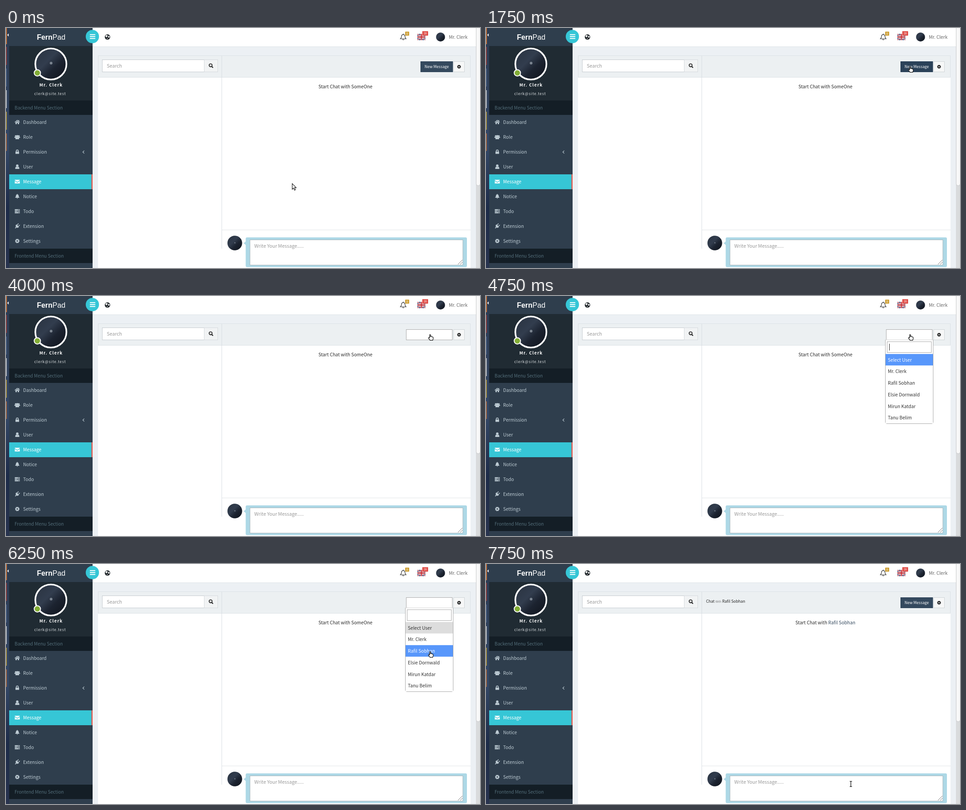
Write an HTML page that moves like this. It is 1051x533 px and loops after 8 s.

```html
<!DOCTYPE html>
<html lang="en">
<head>
<meta charset="utf-8">
<title>Message panel</title>
<style>
  html, body { margin: 0; width: 100%; height: 100%; overflow: hidden; background: #ecf0f4; }
  svg { display: block; }
  text { font: 10.2px "Noto Sans CJK JP", "Noto Sans CJK SC", "Noto Sans", sans-serif; white-space: pre; }
  .mid { text-anchor: middle; }
  .brand { font: 16px "Liberation Sans", Arial, sans-serif; fill: #fff; }
  .brand tspan, .name { font-weight: bold; }
  .name { font-size: 9.5px; letter-spacing: 1.2px; fill: #fff; }
  .mail { font-size: 8.1px; letter-spacing: 1px; fill: #e4e8ea; }
  .section { fill: #526c78; font-size: 10.1px; }
  .item { fill: #bccad2; color: #bccad2; }
  .item.on { fill: #fff; color: #fff; }
  .hint { fill: #999; font-size: 10.6px; }
  .small { font-size: 8.65px; }
  .badge { font-size: 6px; fill: #fff; text-anchor: middle; }
</style>
</head>
<body>
<svg id="stage" width="1051" height="533" viewBox="0 0 1051 533">
  <defs>
    <linearGradient id="photo" x1="0" y1="0" x2="1" y2="1">
      <stop offset="0" stop-color="#29323f"/><stop offset=".4" stop-color="#323d4e"/>
      <stop offset=".62" stop-color="#1c2330"/><stop offset="1" stop-color="#0e131b"/>
    </linearGradient>
    <linearGradient id="desk" x1="0" y1="0" x2="0" y2="1">
      <stop offset="0" stop-color="#2c3a50"/><stop offset=".5" stop-color="#344766"/>
      <stop offset=".75" stop-color="#1d2b49"/><stop offset="1" stop-color="#28334f"/>
    </linearGradient>
    <g id="gear" fill="none" stroke="currentColor">
      <circle r="2.8" stroke-width="2.4"/>
      <circle r="4.2" stroke-width="1.6" stroke-dasharray="1.7 1.6"/>
    </g>
    <g id="home" fill="currentColor"><path d="M-6 0 0-5 6 0 5 1 0-3.2-5 1zM-4 1 0-2.3 4 1V4.5H1V1.5H-1V4.5H-4zM2.6-4.5H4.2V-1L2.6-2.3z"/></g>
    <g id="user" fill="currentColor"><circle cy="-2.3" r="2.8"/><path d="M-4.5 5V3Q-4.3.2-2 0 0 1.6 2 0 4.3.2 4.5 3V5z"/></g>
    <g id="team"><use href="#user" transform="translate(-3.6 -1) scale(.6)"/><use href="#user" transform="translate(3.6 -1) scale(.6)"/><use href="#user" y=".5" transform="scale(.9)"/></g>
    <g id="lock" fill="currentColor"><path d="M-4-.5H4V4.5H-4z"/><path d="M-2.3 0V-2A2.3 2.3 0 0 1 2.3-2V0" fill="none" stroke="currentColor" stroke-width="1.5"/></g>
    <g id="letter" fill="currentColor"><path d="M-5.5-4H5.5V-3L0 1-5.5-3zM-5.5-1.6 0 2.4 5.5-1.6V4.3H-5.5z"/></g>
    <g id="bell" fill="currentColor"><path d="M-5 3Q-3 1-3-1.5-3-4-.6-4.4V-5.4H.6V-4.4Q3-4 3-1.5 3 1 5 3zM-1.4 3.6H1.4Q1 5 0 5T-1.4 3.6z"/></g>
    <g id="tasks" fill="currentColor"><path d="M-5.5-4.5H5.5V-2H-5.5zM-5.5-1.2H5.5V1.3H-5.5zM-5.5 2.1H5.5V4.6H-5.5z"/><path d="M1-3.2H4.5M-1 0H4.5M2 3.3H4.5" stroke="#2f3e4d" stroke-width=".8"/></g>
    <g id="plug" fill="currentColor" transform="rotate(45)"><path d="M-4-1.5H4Q4 3 .8 3.3V6.5H-.8V3.3Q-4 3-4-1.5zM-2.8-6H-1.3V-2H-2.8zM1.3-6H2.8V-2H1.3z"/></g>
    <g id="arrow"><path d="M.6.6V13.2L3.5 10.5 5.7 15.3 7.9 14.3 5.8 9.6H9.5z" fill="#fff" stroke="#111" stroke-width="1.1"/></g>
    <g id="hand"><path d="M3.2 7.8V1.8Q3.3.7 4.3.7T5.4 1.8V5Q7-.1 4.9 5 6.2 4.3 7.2 5.4 8.4 4.9 9.2 5.9 11 5.7 11.2 7.4V9.7L10.1 13.4H4.3L1 9.1Q.3 7.8 1.3 7.3T3.2 7.8z" fill="#fff" stroke="#111" stroke-width="1.2"/></g>
    <g id="beam"><path d="M.5.7H2.3L3 1.2 3.7.7H5.5M3 1.2V11.8M.5 12.3H2.3L3 11.8 3.7 12.3H5.5" fill="none" stroke="#fff" stroke-width="2.6"/><path d="M.5.7H2.3L3 1.2 3.7.7H5.5M3 1.2V11.8M.5 12.3H2.3L3 11.8 3.7 12.3H5.5" fill="none" stroke="#111" stroke-width="1.3"/></g>
  </defs>

  <rect width="1051" height="533" fill="#ecf0f4"/>

  <!-- desktop edge -->
  <rect width="7" height="533" fill="url(#desk)"/>
  <path d="M0 0H2V36H0zM0 234H1.5V273H0z" fill="#c2743f"/>
  <path d="M0 42H1.5V82H0z" fill="#a8403a"/>
  <path d="M0 90H1.5V130H0z" fill="#50698f"/>
  <path d="M0 138H1.5V178H0z" fill="#d4d6da"/>
  <path d="M0 186H1.5V226H0z" fill="#c9a83f"/>
  <path d="M6 12V19L2.5 15.5z" fill="#e8e8e8"/>

  <!-- top bar -->
  <rect x="192" width="850" height="41" fill="#fff"/>
  <path d="M192 41.5H1042" stroke="#dfe4e8"/>
  <circle cx="225" cy="20" r="6" fill="#22282c"/>
  <path d="M221 16.5 224 15.5 225.5 18 223 20.5 220.5 19zM227 17 230 18.5 229 22 226.5 20.5zM223.5 22 225.5 23 224.5 25z" fill="#fff"/>
  <path d="M874.5 24Q877 21.5 877 18.5 877 14.7 880.8 14.3 884.6 14.7 884.6 18.5 884.6 21.5 887 24zM879 25Q880.8 28 882.6 25M880.8 12.6V14.3" fill="none" stroke="#333" stroke-width="1.2"/>
  <rect x="885" y="8" width="9" height="9" rx="1" fill="#cfa23a"/><text class="badge" x="889.5" y="14.7">0</text>
  <svg x="912" y="13" width="18" height="14" viewBox="0 0 18 14">
    <rect width="18" height="14" fill="#2b3f78"/>
    <path d="M0 0 18 14M18 0 0 14" stroke="#eee" stroke-width="3"/>
    <path d="M0 0 18 14M18 0 0 14" stroke="#c8353d" stroke-width="1.2"/>
    <path d="M9 0V14M0 7H18" stroke="#eee" stroke-width="4.4"/>
    <path d="M9 0V14M0 7H18" stroke="#c8353d" stroke-width="2.6"/>
  </svg>
  <rect x="923" y="7" width="13" height="10" rx="1" fill="#e0524d"/><text class="badge" x="929.5" y="14.2">16</text>
  <circle cx="963.5" cy="20" r="10" fill="url(#photo)"/>
  <text x="982" y="24" fill="#666">Mr. Clerk</text>

  <!-- sidebar -->
  <rect x="7" width="185" height="533" fill="#2f3e4d"/>
  <rect x="7" y="40" width="185" height="121" fill="#202b33"/>
  <rect x="7" y="161" width="185" height="32" fill="#141e26"/>
  <rect x="7" y="490" width="185" height="32" fill="#141e26"/>
  <rect x="7" y="325" width="185" height="33" fill="#36c6d6"/>
  <rect x="189.5" y="325" width="2.5" height="33" fill="#e2574f"/>
  <text class="brand mid" x="100" y="26"><tspan>Fern</tspan>Pad</text>
  <circle cx="191.5" cy="19" r="14.7" fill="#36c6d6"/>
  <path d="M186 14.8H198M186 19H198M186 23.2H198" stroke="#fff" stroke-width="2"/>
  <circle cx="99.5" cy="80" r="34.5" fill="url(#photo)" stroke="#fff" stroke-width="3.6"/>
  <circle cx="100" cy="78" r="3" fill="#7b8490"/>
  <circle cx="69.5" cy="99.7" r="7" fill="#82ad35" stroke="#fff" stroke-width="2"/>
  <text class="name mid" x="100" y="130">Mr. Clerk</text>
  <text class="mail mid" x="98" y="149">clerk@site.test</text>
  <text class="section" x="19" y="181">Backend Menu Section</text>
  <text class="section" x="19" y="510">Frontend Menu Section</text>
  <g id="menu"></g>
  <path d="M173.5 272.3 170.3 275.5 173.5 278.7" fill="none" stroke="#bccad2" stroke-width="1.2"/>

  <!-- chat panel -->
  <rect x="204" y="62" width="826" height="471" fill="#fff"/>
  <rect x="204.5" y="61.5" width="825" height="48" fill="#ecf0f2" stroke="#dce2e6"/>
  <path d="M478.5 62V490" stroke="#d8dee2"/>
  <path d="M479 448.5H1030" stroke="#e2e5e8"/>
  <rect x="213.5" y="70.5" width="226" height="27" fill="#fff" stroke="#c5cbd0"/>
  <rect x="439.5" y="70.5" width="30" height="27" fill="#f1f3f4" stroke="#d6dade"/>
  <text class="hint" x="223.5" y="87.5">Search</text>
  <path d="M456.3 85.5 459 88.3" stroke="#222" stroke-width="2.2"/>
  <circle cx="453.7" cy="82.8" r="3.3" fill="none" stroke="#222" stroke-width="1.7"/>
  <text id="chatWith" class="small" x="488" y="86" fill="#222">Chat <tspan font-size="6.2" fill="#777">With</tspan> Rafil Sobhan</text>
  <text id="intro" class="mid" x="752.5" y="133.5" fill="#2a2a2a">Start Chat with <tspan id="partner"></tspan></text>
  <rect x="992.5" y="74.5" width="24" height="23" fill="#f6f7f7" stroke="#cfd4d7"/>
  <use href="#gear" transform="translate(1004.5 86) scale(.85)" color="#222"/>

  <svg id="button" y="74">
    <rect id="face" width="100%" height="100%"/>
    <text class="mid" x="50%" y="15" fill="#fff" style="font-size:8.6px">New Message</text>
  </svg>
  <svg id="select">
    <rect width="100%" height="100%" fill="#fff" stroke="#aaa" stroke-width="2"/>
    <text id="picked" x="17" y="14.5" fill="#555">Ra...</text>
  </svg>
  <g id="drop">
    <path d="M886 97.5V280Q886 283 889 283H988Q991 283 991 280V97.5z" fill="#fff"/>
    <path d="M885.5 97V280Q885.5 283.5 889 283.5H988Q991.5 283.5 991.5 280V97" fill="none" stroke="#aaa"/>
    <rect x="889.5" y="101.5" width="98" height="24" fill="#fff" stroke="#aaa"/>
    <path id="caret" d="M894.5 106V121" stroke="#222"/>
    <g id="rows"></g>
  </g>

  <!-- composer -->
  <circle cx="507.3" cy="477.5" r="16.3" fill="url(#photo)"/>
  <circle cx="507.5" cy="477" r="1.5" fill="#66707c"/>
  <path d="M527 478 533 473V483z" fill="#add8e6"/>
  <rect x="531.5" y="465" width="490.5" height="66" rx="3" fill="#add8e6"/>
  <rect x="541" y="470.5" width="472" height="56" fill="#fff" stroke="#a5b4ba"/>
  <text class="hint" x="550.5" y="487.5">Write Your Message.....</text>
  <path d="M1002 525 1012 515M1007 525 1012 520" stroke="#777"/>

  <!-- scrollbar -->
  <rect x="1042" width="9" height="533" fill="#d9dbdc"/>
  <rect x="1042.5" y="-4" width="9" height="354" rx="4" fill="#f8f8f8" stroke="#c6c8ca"/>

  <use id="cursor"/>
</svg>
<script>
const $ = id => document.getElementById(id);
const LOOP = 8000, STEP = 250, ROW = 25.7;

const menu = ["home Dashboard", "team Role", "lock Permission", "user User", "letter Message",
  "bell Notice", "tasks Todo", "plug Extension", "gear Settings"];
$("menu").innerHTML = menu.map((entry, i) => {
  const [icon, label] = entry.split(" "), y = 209 + 33 * i;
  return `<g class="item${i == 4 ? " on" : ""}"><use href="#${icon}" x="25" y="${y}"/>` +
    `<text x="38" y="${y + 4}">${label}</text></g>`;
}).join("");

const people = ["Select User", "Mr. Clerk", "Rafil Sobhan", "Elsie Dornwald", "Mirun Katdar", "Tanu Belim"];
$("rows").innerHTML = people.map((name, i) =>
  `<rect x="886" y="${128.8 + ROW * i}" width="105" height="${ROW}"/>` +
  `<text x="891" y="${145.7 + ROW * i}">${name}</text>`).join("");
const rows = $("rows").children;

// start time, shape, x, y
const cursorPath = [
  [0, "arrow", 634, 345], [750, "arrow", 641, 342], [1000, "arrow", 861, 244],
  [1250, "arrow", 908, 136], [1500, "arrow", 935, 101], [1750, "hand", 936, 85],
  [5250, "hand", 939, 102], [5500, "hand", 943, 193], [5750, "hand", 942, 212],
  [6000, "hand", 939, 194], [6250, "hand", 936, 194], [6750, "arrow", 940, 194],
  [7500, "arrow", 842, 432], [7750, "beam", 806, 482]
];
// start time, highlighted row
const hovers = [[0, 0], [5500, 2], [5750, 3], [6000, 2]];

const at = (list, t) => list.filter(k => k[0] <= t).pop();
const swing = p => .5 - Math.cos(Math.PI * Math.min(1, Math.max(0, p))) / 2;
const show = (id, on) => { $(id).style.display = on ? "" : "none"; };

function put(id, x, y, w, h, scale) {
  const el = $(id);
  Object.entries({ x, y, width: w, height: h }).forEach(([k, v]) => el.setAttribute(k, v));
  el.style.opacity = scale;
  show(id, scale > .01);
}

function draw(t) {
  const back = t >= 6500, start = back ? 6500 : 3000;
  const leaving = 1 - swing((t - start) / 600), entering = swing((t - start) / 1000);
  const b = back ? entering : leaving, s = back ? leaving : entering;

  const sw = 103 * s, sh = 24 * s;
  put("select", 990 - sw, 86 - sh / 2, sw, sh, s);
  const right = s > .01 ? 989 - sw : 991;
  const drop = back ? 0 : Math.min(13, (1 - b) * 35);
  put("button", right - 72 * b, 74 + drop, 72 * b, 24 * b, b);
  const face = t < 1750 || back ? "#34495e" : t < 3000 ? "#2b4259" : "#253a4f";
  $("face").setAttribute("fill", face);

  const chosen = t >= 6750;
  show("picked", chosen);
  show("chatWith", chosen);
  $("partner").textContent = chosen ? people[2] : "SomeOne";
  $("partner").setAttribute("fill", chosen ? "#34495e" : "#2a2a2a");

  show("drop", t >= 4750 && !chosen);
  show("caret", t < 5750);
  const hover = at(hovers, t)[1];
  people.forEach((_, i) => {
    rows[2 * i].setAttribute("fill", i == hover ? "#5897fb" : i ? "#fff" : "#ddd");
    rows[2 * i + 1].setAttribute("fill", i == hover ? "#fff" : "#333");
  });

  const [, shape, x, y] = at(cursorPath, t);
  $("cursor").setAttribute("href", "#" + shape);
  $("cursor").setAttribute("transform", `translate(${x} ${y})`);
}

const origin = performance.now();
function tick() {
  const t = (performance.now() - origin) % LOOP;
  draw(Math.floor(t / STEP) * STEP);
  requestAnimationFrame(tick);
}
tick();
</script>
</body>
</html>
```
